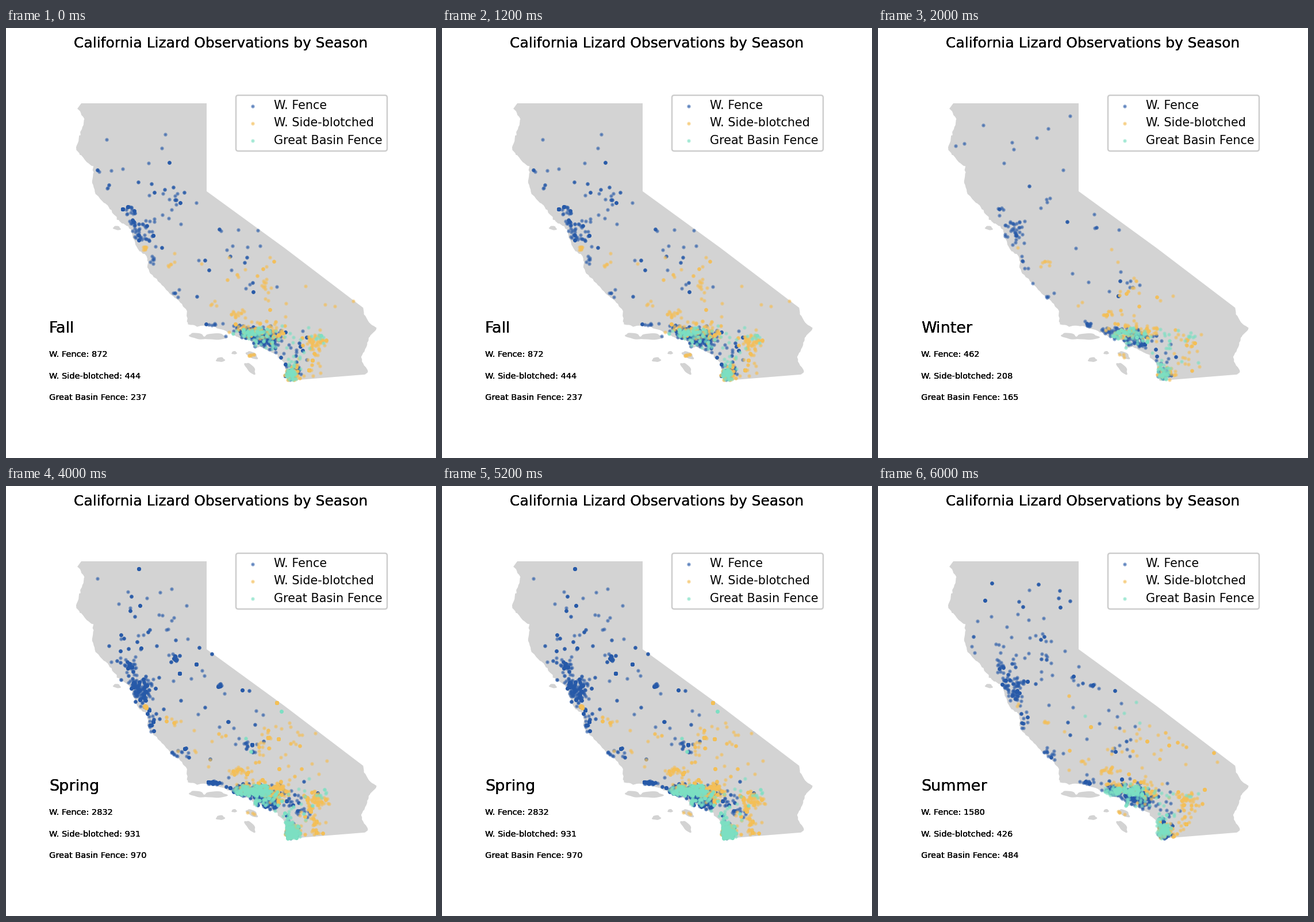
Animation of 748 by 748 pixels, one loop 8 s. Source, as a matplotlib script:

```python
import numpy as np
import matplotlib.pyplot as plt
from matplotlib.animation import FuncAnimation
from matplotlib.path import Path

SIZE, DPI = 748, 187
LAND = "lightgray"
plt.rcParams["font.family"] = "DejaVu Sans"

SEASONS = {
    "Fall": (872, 444, 237),
    "Winter": (462, 208, 165),
    "Spring": (2832, 931, 970),
    "Summer": (1580, 426, 484),
}

# Key points of the map in stage pixels, y pointing down
CORNERS = [(131, 131), (349, 131), (349, 284), (485, 383)]
RIVER = [(621, 486), (622, 496), (634, 515), (647, 523), (633, 534),
         (628, 553), (617, 573), (623, 587), (631, 597), (624, 603)]
COAST = [(490, 614), (484, 605), (487, 597), (483, 582), (470, 569), (446, 555),
         (431, 555), (427, 544), (405, 540), (386, 528), (357, 519), (316, 517),
         (314, 490), (290, 465), (267, 443), (248, 423), (246, 399), (226, 382),
         (217, 349), (197, 337), (183, 316), (155, 288), (150, 265), (152, 243),
         (121, 212), (129, 186), (137, 158), (123, 139)]

# Habitats: centre x, y, spread x, y and share of the sites
FENCE = [
    (214, 314, 6, 5, 14), (223, 346, 5, 9, 18), (239, 362, 7, 8, 26),
    (243, 342, 8, 5, 14), (252, 408, 6, 10, 10), (289, 299, 7, 4, 6),
    (372, 347, 3, 2, 4), (298, 466, 12, 6, 9), (362, 516, 6, 2, 12),
    (426, 450, 10, 9, 9), (413, 529, 13, 6, 50), (447, 537, 13, 8, 90),
    (458, 549, 8, 7, 45), (497, 601, 7, 7, 55), (500, 558, 16, 18, 16),
    (255, 275, 65, 70, 34), (395, 395, 45, 50, 12),
]
BLOTCHED = [
    (402, 496, 9, 4, 12), (430, 524, 16, 7, 42), (470, 530, 10, 9, 36),
    (537, 546, 11, 8, 42), (533, 586, 10, 11, 20), (499, 600, 8, 7, 40),
    (449, 446, 6, 11, 8), (289, 410, 6, 3, 6), (242, 382, 2, 2, 5),
    (354, 478, 5, 3, 3), (428, 569, 6, 3, 5), (510, 455, 50, 40, 24),
    (360, 450, 50, 35, 8),
]
BASIN = [
    (418, 531, 11, 4, 32), (445, 530, 10, 5, 42), (460, 545, 9, 8, 13),
    (433, 550, 2, 3, 5), (497, 602, 6, 7, 58), (490, 584, 4, 5, 9),
    (546, 537, 6, 4, 5), (500, 550, 20, 20, 12), (440, 400, 50, 60, 3),
]
SPECIES = [
    ("W. Fence", "#2659a8", FENCE),
    ("W. Side-blotched", "#f5bf56", BLOTCHED),
    ("Great Basin Fence", "#7ce0c3", BASIN),
]


def pt(px):
    return px * 72 / DPI


def rough(points, seed, step=4, jitter=0.8):
    """Split a line into short steps and shake them into a natural shore."""
    points, rng = np.array(points, float), np.random.default_rng(seed)
    travelled = np.r_[0, np.hypot(*np.diff(points, axis=0).T).cumsum()]
    at = np.arange(0, travelled[-1], step)
    line = np.column_stack([np.interp(at, travelled, axis) for axis in points.T])
    return line + rng.normal(0, jitter, line.shape)


def island(x, y, rx, ry, tilt=0.0):
    a = np.linspace(0, 2 * np.pi, 40)
    r = 1 + 0.1 * np.sin(3 * a) + 0.07 * np.sin(5 * a + 1)
    u, v = rx * r * np.cos(a), ry * r * np.sin(a)
    return np.column_stack([x + u * np.cos(tilt) - v * np.sin(tilt),
                            y + u * np.sin(tilt) + v * np.cos(tilt)])


LANDS = [
    np.vstack([CORNERS, rough(RIVER, 1), rough(COAST, 2)]),
    island(333, 536, 14, 5, 0.2), island(364, 537, 20, 5.5),
    island(428, 569, 11, 5, 0.5), island(425, 592, 12.5, 5.5, 0.85),
    island(373, 577, 7.5, 4), island(397, 565, 4.5, 2.8), island(193, 348, 6.5, 3.5, 0.2),
]


def sightings(season, kind, total):
    """Sites in their habitats on land, a few of them visited again and again."""
    rng = np.random.default_rng(10 * season + kind)
    habitats = np.array(SPECIES[kind][2])
    shares = habitats[:, 4] / habitats[:, 4].sum()
    sites = int(6 * total ** 0.6)
    picks = habitats[rng.choice(len(habitats), 4 * sites, p=shares)]
    spots = rng.normal(picks[:, :2], picks[:, 2:4])
    on_land = np.any([Path(land).contains_points(spots) for land in LANDS], axis=0)
    spots = spots[on_land][:sites]
    visits = rng.pareto(1, sites)
    repeats = rng.choice(sites, total - sites, p=visits / visits.sum())
    return np.vstack([spots, spots[repeats]])


fig = plt.figure(figsize=(SIZE / DPI, SIZE / DPI), dpi=DPI, facecolor="white")
ax = fig.add_axes([0, 0, 1, 1])
ax.set(xlim=(0, SIZE), ylim=(SIZE, 0))
ax.axis("off")

for land in LANDS:
    ax.fill(*land.T, color=LAND, lw=0)

dots = [
    ax.scatter([], [], s=pt(3.4) ** 2, lw=pt(3.1), color=color, alpha=0.5, label=label)
    for label, color, _ in SPECIES
]
frame = ax.legend(loc="upper right", bbox_to_anchor=(663 / SIZE, 1 - 116.8 / SIZE),
                  borderaxespad=0, fontsize=pt(20.7), framealpha=1).get_frame()
frame.set_linewidth(pt(2.4))


def heavy_text(x, y, px, text="", **style):
    """Stacked copies harden the glyph edges."""
    return [ax.text(x, y, text, fontsize=pt(px), **style) for _ in range(3)]


heavy_text(373.7, 34.3, 24.93, "California Lizard Observations by Season", ha="center")
heading = heavy_text(74.8, 530, 27)
tallies = [heavy_text(74.8, 572.2 + 37.4 * i, 14.46) for i in range(3)]
points = [[sightings(season, kind, count) for kind, count in enumerate(counts)]
          for season, counts in enumerate(SEASONS.values())]


def update(season):
    name, counts = list(SEASONS.items())[season]
    for copy in heading:
        copy.set_text(name)
    for kind, count in enumerate(counts):
        dots[kind].set_offsets(points[season][kind])
        for copy in tallies[kind]:
            copy.set_text(f"{SPECIES[kind][0]}: {count}")


anim = FuncAnimation(fig, update, frames=len(SEASONS), interval=2000, repeat=True, repeat_delay=0)
plt.show()
```
